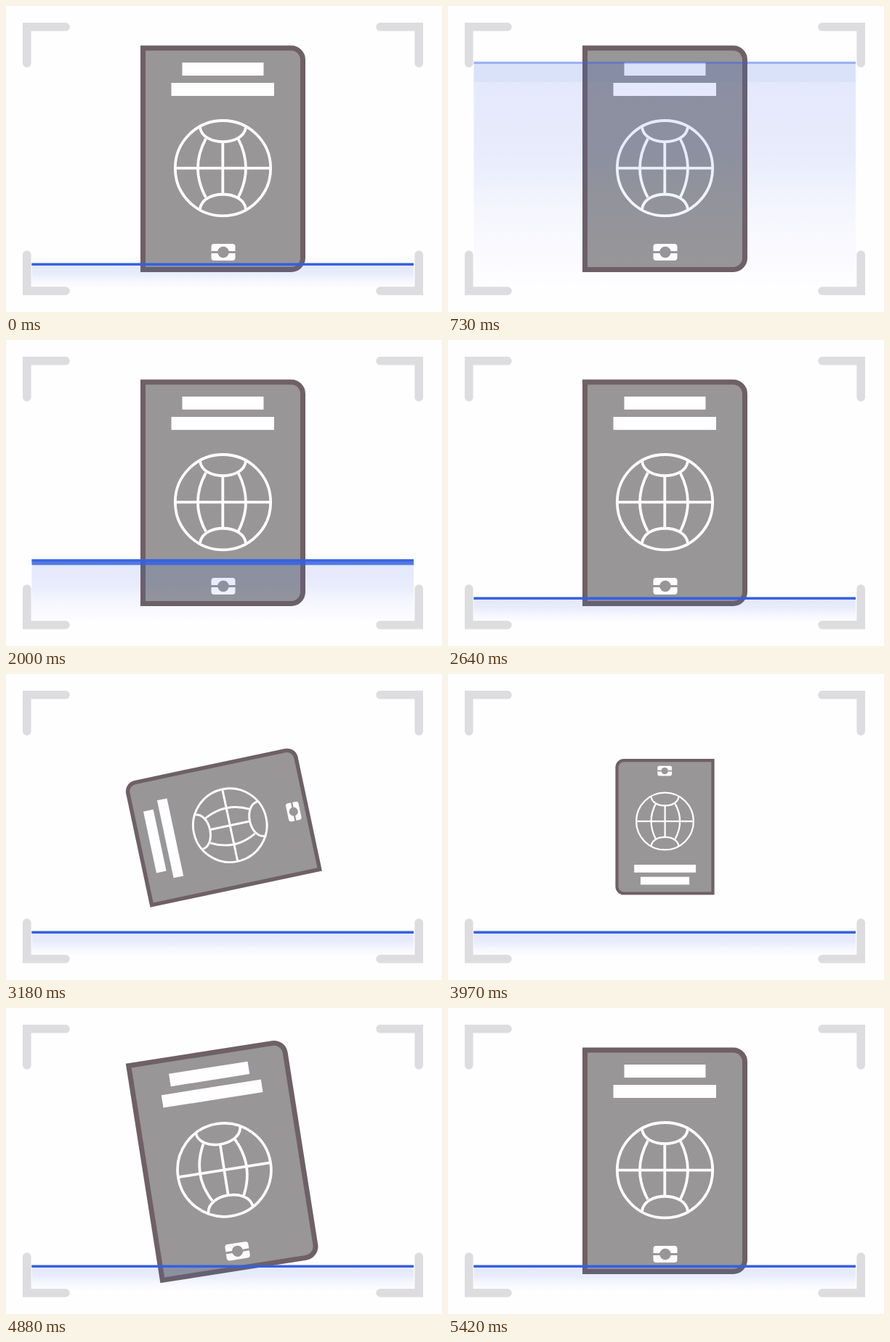
Write an HTML page that moves like this. It is 600 by 422 pixels and loops after 5480 ms.

```html
<!DOCTYPE html>
<html lang="en">
<head>
<meta charset="utf-8">
<title>Passport scan</title>
<style>
  html, body { margin: 0; width: 100%; height: 100%; overflow: hidden; background: #fefdff; }
  svg { display: block; width: 600px; height: 422px; }
</style>
</head>
<body>
<svg viewBox="0 0 600 422">
  <defs>
    <linearGradient id="fade" x1="0" y1="0" x2="0" y2="1">
      <stop offset="0" stop-color="#3460e2" stop-opacity=".13"/>
      <stop offset=".35" stop-color="#3460e2" stop-opacity=".11"/>
      <stop offset=".65" stop-color="#3460e2" stop-opacity=".04"/>
      <stop offset="1" stop-color="#3460e2" stop-opacity="0"/>
    </linearGradient>
  </defs>

  <g fill="none" stroke="#dddcde" stroke-width="11.6" stroke-linecap="round">
    <path d="M28.8 79V28.8H82"/>
    <path d="M568.2 79V28.8H515"/>
    <path d="M28.8 343V393H82"/>
    <path d="M568.2 343V393H515"/>
  </g>

  <g id="passport">
    <path d="M188.5 58H392.5A16 16 0 0 1 408.5 74V347.5A16 16 0 0 1 392.5 363.5H188.5Z"
          fill="#989697" stroke="#6e6064" stroke-width="7"/>
    <g fill="#fefdff">
      <path d="M242.5 78H354.5V96H242.5ZM227.5 106H369V124H227.5Z"/>
      <rect x="282.5" y="328" width="33" height="23" rx="4"/>
    </g>
    <path d="M282 339.5H316" stroke="#989697" stroke-width="3"/>
    <circle cx="299" cy="339.5" r="7.8" fill="#989697"/>
    <g fill="none" stroke="#fefdff" stroke-width="3.8">
      <circle cx="298.5" cy="223.7" r="65.7"/>
      <path d="M232 223.7H365M298.3 187V260"/>
      <path d="M267 167C270 194 327 194 330 167M267 280C270 253 327 253 330 280"/>
      <path d="M275 183Q253 223.7 275 264M319.5 183Q340.5 223.7 319.5 264"/>
    </g>
  </g>

  <rect id="glow" x="35.5" width="525.5" fill="url(#fade)"/>
  <rect id="bar" x="35.5" width="525.5" fill="#3460e2"/>
  <rect id="edge" x="35.5" width="525.5" height="3" fill="#3460e2"/>
</svg>
<script>
const LOOP = 5480, FLOOR = 390, REST = 35.3, RISE = 320;
const [passport, glow, bar, edge] =
  ['passport', 'glow', 'bar', 'edge'].map(id => document.getElementById(id));

// Eased progress along cubic-bezier(a, 0, b, 1)
function ease(t, start, length, a, b) {
  const x = Math.min(1, Math.max(0, (t - start) / length));
  let lo = 0, hi = 1;
  for (let i = 0; i < 24; i++) {
    const s = (lo + hi) / 2, r = 1 - s;
    if (3 * r * r * s * a + 3 * r * s * s * b + s * s * s < x) lo = s; else hi = s;
  }
  return lo * lo * (3 - 2 * lo);
}

function set(el, attrs) {
  for (const name in attrs) el.setAttribute(name, attrs[name]);
}

function draw(now) {
  const t = now % LOOP;

  // The scan beam stretches upward from a fixed bottom, then shrinks back.
  const lift = ease(t, 0, 1350, .5, .05) - ease(t, 1500, 990, .5, .05);
  const height = REST + RISE * lift;
  const top = FLOOR - height;
  const thick = height * .09;
  set(glow, { y: top + thick, height: height - thick });
  set(bar, { y: top, height: thick, opacity: 1 - .95 * lift });
  set(edge, { y: top, opacity: 1 - .7 * lift });

  // The passport flips over while shrinking, then returns.
  const turn = ease(t, 2821, 867, .45, .25) - ease(t, 4054, 1179, .5, .1);
  set(passport, {
    transform: `translate(298.5 210.8) rotate(${-180 * turn}) scale(${1 - .4 * turn}) translate(-298.5 -210.8)`
  });
}

const begin = performance.now();
function tick() {
  draw(performance.now() - begin);
  requestAnimationFrame(tick);
}
tick();
</script>
</body>
</html>
```
